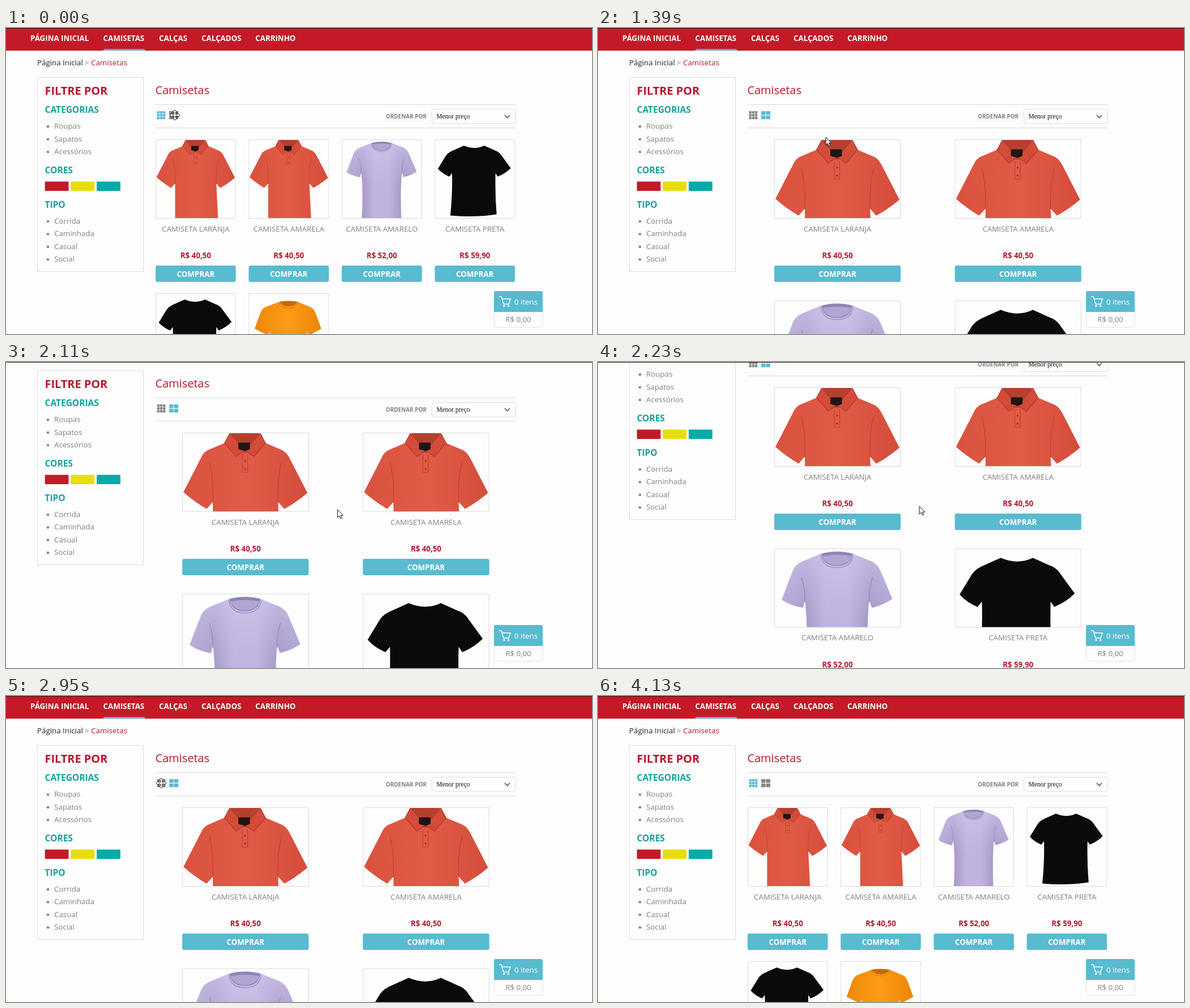
Recreate the animation shown at these times as an HTML page. Size 1034 by 541 pixels, loop 4180 ms.

```html
<!DOCTYPE html>
<html lang="pt">
<head>
<meta charset="utf-8">
<title>Camisetas</title>
<style>
  html, body { margin: 0; width: 100%; height: 100%; overflow: hidden; background: #fdfdfe; }
  #stage { display: block; font: 13.3px "Open Sans", sans-serif; fill: #808080; }
  .b { font-weight: 700; }
  .m { text-anchor: middle; }
  .w { fill: #fff; }
  .red { fill: #b5182a; }
  .teal { fill: #14a39b; }
  .frame { fill: none; stroke: #dcdcdf; }
</style>
</head>
<body>
<svg id="stage" width="1034" height="541" viewBox="0 0 1034 541">
  <defs>
    <linearGradient id="orangeRed"><stop stop-color="#d9523f"/><stop offset=".22" stop-color="#dd5642"/><stop offset=".5" stop-color="#e25b46"/><stop offset=".78" stop-color="#db5441"/><stop offset="1" stop-color="#d44d3b"/></linearGradient>
    <linearGradient id="lilac"><stop stop-color="#b3a7d4"/><stop offset=".22" stop-color="#a699c9"/><stop offset=".4" stop-color="#c0b4df"/><stop offset=".6" stop-color="#c0b4df"/><stop offset=".8" stop-color="#a497c7"/><stop offset="1" stop-color="#ada1cf"/></linearGradient>
    <linearGradient id="glow" x2="0" y2="1"><stop stop-color="#d3c8ee" stop-opacity=".7"/><stop offset=".6" stop-color="#c8bde5" stop-opacity="0"/></linearGradient>
    <linearGradient id="amber"><stop stop-color="#f08708"/><stop offset=".5" stop-color="#fb9c14"/><stop offset="1" stop-color="#ee8508"/></linearGradient>
    <path id="lavenderCut" d="M53 5Q70 1 87 5L109 14Q115 17 118 23L132 56Q122 63 109 66L106 57Q103 90 105 139H35Q38 90 34 57L32 66Q18 64 8 57L21 23Q24 17 31 14Z"/>
    <g id="polo">
      <path fill="url(#orangeRed)" d="M52 1L70 0L88 1L93 11L112 19Q117 22 120 28L140 67Q127 78 114 85L107 77L110 139H34L34 77L27 85Q12 76 1 66L21 27Q23 22 28 19L47 11Z"/>
      <path fill="none" stroke="#b8402f" stroke-width=".7" d="M34 78Q35 50 30 32M107 78Q106 50 111 32M67 24V44H73V24"/>
      <path fill="#b5402f" d="M54 0H86L79 20L70 22L61 20Z"/>
      <path fill="#d34c39" stroke="#aa3829" stroke-width=".7" d="M53 0L47 11L60 26L69 20L61 9ZM87 0L93 11L80 26L71 20L79 9Z"/>
      <path fill="#211514" d="M62.500 10.500H75.500V18L70 20L62.500 18Z"/>
      <g fill="#8f3023"><circle cx="70" cy="31" r="1"/><circle cx="70" cy="40" r="1"/></g>
    </g>
    <g id="lavender">
      <use href="#lavenderCut" fill="url(#lilac)"/>
      <use href="#lavenderCut" fill="url(#glow)"/>
      <path fill="#8f84b4" d="M53 5Q70 1 87 5Q86 19 70 19Q54 19 53 5Z"/>
      <path fill="#b1a5d3" d="M54 8Q70 5 86 8Q83 18 70 18Q57 18 54 8Z"/>
      <path fill="none" stroke="#9588bb" stroke-width=".8" d="M52 6Q53 21 70 21Q87 21 88 6M34 60Q34 42 30 32M106 60Q106 42 110 32"/>
    </g>
    <path id="black" fill="#0a0a0c" d="M51 10Q70 18 87 10L105 18Q114 21 118 28L134 50Q124 60 111 65L107 59Q106 95 109 132Q70 138 27 134Q31 95 30 59L25 65Q13 60 5 51L19 28Q23 22 33 18Z"/>
    <g id="orange">
      <path fill="url(#amber)" d="M54 14Q70 12 86 14L108 23Q115 26 118 34L128 62L106 74L103 66V139H37V66L34 74L10 62L20 34Q23 26 30 23Z"/>
      <path fill="#c56a05" d="M54 14Q70 11 86 14Q82 22 70 22Q58 22 54 14Z"/>
      <path fill="none" stroke="#d97a06" d="M52 15Q57 25 70 25Q83 25 88 15"/>
    </g>
  </defs>
  <g id="page"></g>
  <g id="cart">
    <path fill="#fdfdfe" stroke="#e4e4e8" d="M861.500 500V526Q861.500 529 864 529H944Q947 529 947 526V500"/>
    <path fill="#58bbd0" d="M861 502V468Q861 465 864 465H944Q947 465 947 468V502Z"/>
    <path fill="none" stroke="#fff" stroke-width="1.600" d="M870 475H874L878 488H887L890 479H876"/>
    <circle class="w" cx="879" cy="491.500" r="1.700"/><circle class="w" cx="886.500" cy="491.500" r="1.700"/>
    <text class="w" x="897" y="489">0 itens</text>
    <text class="m" x="904" y="520">R$ 0,00</text>
  </g>
  <path fill="#35101a" d="M0 0H1034V1H0Z"/>
  <g id="pointer" fill="#fff" stroke="#111" stroke-linejoin="round">
    <path id="arrow" d="M0 0V14L3.300 11L5.500 16L7.700 15L5.500 10.200H9.800Z"/>
    <path id="hand" d="M-1.500 11V1.500Q0-.5 1.500 1.500V7Q3 5.500 4 7.500Q5.500 6.500 6.500 8Q8.500 7 8.500 10V13Q8.500 15 7 16V19H-1V17L-5 11.500Q-5 8.500-2.500 10Z"/>
    <path id="move" d="M0-9L4-5H1.500V-1.500H5V-4L9 0L5 4V1.500H1.500V5H4L0 9L-4 5H-1.500V1.500H-5V4L-9 0L-5-4V-1.500H-1.500V-5H-4Z"/>
  </g>
</svg>
<script>
const $ = id => document.getElementById(id);
const LOOP = 4180, TO_WIDE = 960, TO_SMALL = 2960, HIDE = 3450;
const BLUE = '#58bbd0', GRAY = '#858587';
const layouts = {
  small: { cols: 4, x: 264.5, dx: 164.2, w: 140.5, dy: 272 },
  wide: { cols: 2, x: 311.5, dx: 318.7, w: 222, dy: 284.6 }
};
const products = [
  ['polo', 'LARANJA', '40,50'], ['polo', 'AMARELA', '40,50'], ['lavender', 'AMARELO', '52,00'],
  ['black', 'PRETA', '59,90'], ['black', 'PRETA', '59,90'], ['orange', 'LARANJA', '62,00']
];

// Keyframes: time, then values
const scrollKeys = [[2000, 0], [2020, 11], [2060, 11], [2130, 95], [2230, 152], [2270, 152], [2380, 0]];
const pointerKeys = [[1250, 298, 154], [1650, 593, 264], [2060, 593, 264], [2230, 567, 255], [2270, 567, 255],
  [2400, 497, 222], [2440, 497, 222], [2750, 274, 154], [3050, 274, 154], [3410, 582, 24]];

const text = (x, y, s, cls = '', size = 13.3) =>
  `<text x="${x}" y="${y}" class="${cls}" font-size="${size}">${s}</text>`;
const rect = (x, y, w, h, fill, r = 0) =>
  `<rect x="${x}" y="${y}" width="${w}" height="${h}" rx="${r}" fill="${fill}"/>`;
const tiles = (n, x, dx, dy, w, h, fill) => Array.from({ length: n * n }, (_, i) =>
  rect(x + i % n * dx, 147 + Math.floor(i / n) * dy, w, h, fill, .5)).join('');
const list = (items, y) => items.map((s, i) =>
  `<circle cx="74" cy="${y - 4 + i * 22.4}" r="2.2"/>` + text(85, y + i * 22.4, s)).join('');

function grid(name) {
  const { cols, x, dx, w, dy } = layouts[name];
  const small = name === 'small';
  const cards = products.map(([shirt, label, price], i) => {
    const left = x + i % cols * dx, top = Math.floor(i / cols) * dy, mid = left + w / 2;
    return `<svg x="${left}" y="${198 + top}" width="${w}" height="138.500" viewBox="0 0 141 ${138.5 * 141 / w}"><use href="#${shirt}"/></svg>
      <rect class="frame" x="${left}" y="${197.5 + top}" width="${w}" height="139"/>`
      + text(mid, 359.5 + top, 'CAMISETA ' + label, 'm')
      + text(mid, 407 + top, 'R$ ' + price, 'm b red')
      + rect(left - .5, 420 + top, w + 1, 29, BLUE, 3)
      + text(mid, 439.7 + top, 'COMPRAR', 'm b w');
  }).join('');
  return `<g id="${name}">`
    + tiles(3, 266.5, 5.2, 5, 4.4, 4.2, small ? BLUE : GRAY)
    + tiles(2, 288, 8.5, 7.7, 7.5, 6.6, small ? GRAY : BLUE)
    + cards + '</g>';
}

const nav = [[43, 'PÁGINA INICIAL'], [171.5, 'CAMISETAS'], [270, 'CALÇAS'], [345, 'CALÇADOS'], [440, 'CARRINHO']];
$('page').innerHTML =
  rect(0, 0, 1034, 40, '#c41926') + rect(172, 37, 73, 3, '#78a5c4')
  + nav.map(([x, s]) => text(x, 23, s, 'b w')).join('')
  + `<g fill="#222">${text(55, 66, 'Página Inicial')}</g>` + text(139, 66, '&gt;') + text(150, 66, 'Camisetas', 'red')
  + '<rect class="frame" x="55.500" y="87.500" width="187" height="343"/>'
  + text(68.5, 118, 'FILTRE POR', 'b red', 19.9)
  + text(68.5, 150, 'CATEGORIAS', 'b teal', 15.5) + list(['Roupas', 'Sapatos', 'Acessórios'], 178.3)
  + text(68.5, 257, 'CORES', 'b teal', 15.5)
  + ['#c41926', '#e9de0c', '#05aba8'].map((c, i) => rect(68.7 + i * 45.7, 271.5, 41.7, 16.5, c)).join('')
  + text(68.5, 317.7, 'TIPO', 'b teal', 15.5) + list(['Corrida', 'Caminhada', 'Casual', 'Social'], 346)
  + text(263.5, 117, 'Camisetas', 'red', 19.9)
  + '<path class="frame" d="M264 135.500H900M264 176.500H900"/>'
  + text(670, 160, 'ORDENAR POR', 'b', 9.95)
  + '<rect class="frame" x="751.500" y="143.500" width="148" height="25.500" rx="4"/>'
  + '<text x="759.500" y="160" fill="#111" font-family="Liberation Serif, serif" font-size="11.500">Menor preço</text>'
  + '<path d="M880 154L884.500 158.500L889 154" fill="none" stroke="#777" stroke-width="2"/>'
  + grid('small') + grid('wide');

function sample(keys, t) {
  const i = keys.findIndex(k => k[0] > t);
  if (i === 0) return keys[0].slice(1);
  if (i < 0) return keys[keys.length - 1].slice(1);
  const [t0, ...a] = keys[i - 1], [t1, ...b] = keys[i];
  return a.map((v, j) => v + (b[j] - v) * (t - t0) / (t1 - t0));
}

function pointerKind(x, y, layout) {
  if (x > 264 && x < 306 && y > 144 && y < 164) return 'move';
  const { cols, x: left, dx, w } = layouts[layout];
  const col = Math.floor((x - left) / dx);
  const inside = col >= 0 && col < cols && x - left - col * dx < w;
  return inside && (y > 198 && y < 336 || y > 420 && y < 449) ? 'hand' : 'arrow';
}

const show = (id, on) => $(id).setAttribute('display', on ? 'inline' : 'none');

function draw(now) {
  const t = now % LOOP;
  const layout = t >= TO_WIDE && t < TO_SMALL ? 'wide' : 'small';
  const scroll = Math.round(sample(scrollKeys, t)[0]);
  const [x, y] = sample(pointerKeys, t).map(Math.round);
  for (const name in layouts) show(name, name === layout);
  $('page').setAttribute('transform', `translate(0 ${-scroll})`);
  $('pointer').setAttribute('transform', `translate(${x} ${y})`);
  show('pointer', t < HIDE);
  const kind = pointerKind(x, y + scroll, layout);
  for (const id of ['arrow', 'hand', 'move']) show(id, id === kind);
}

const start = performance.now();
function tick() {
  draw(performance.now() - start);
  requestAnimationFrame(tick);
}
tick();
</script>
</body>
</html>
```
